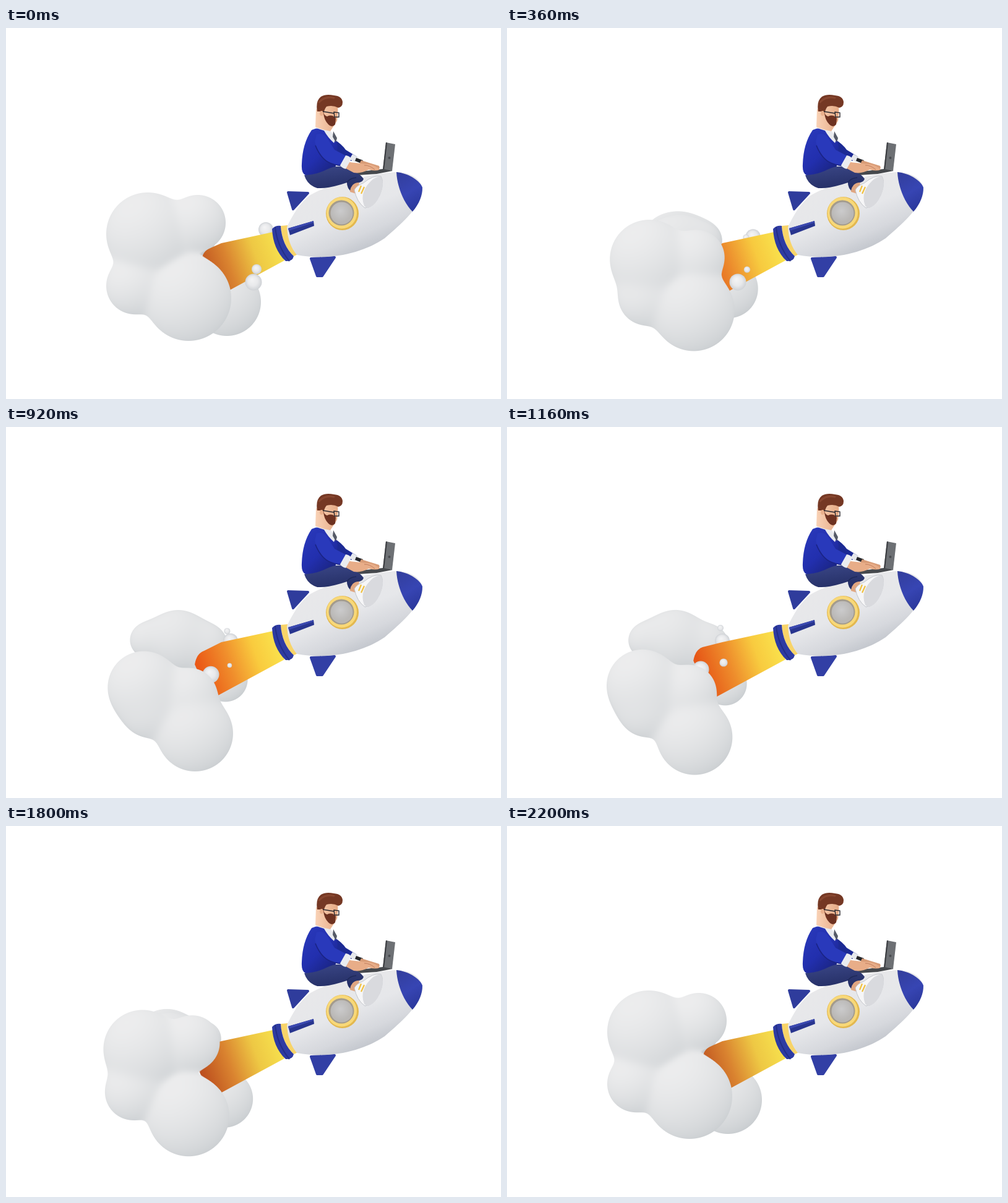
An HTML page with a canvas for the animation above (2.24 s loop, 800x600 px).

```html
<!DOCTYPE html>
<html lang="en">
<head>
<meta charset="utf-8">
<title>Rocket ride</title>
<style>
html, body { margin: 0; width: 100%; height: 100%; overflow: hidden; background: #fff; }
canvas, svg { position: absolute; left: 0; top: 0; width: 800px; height: 600px; }
</style>
</head>
<body>
<canvas id="stage" width="800" height="600"></canvas>
<svg viewBox="0 0 800 600">
  <defs>
    <linearGradient id="hull" gradientUnits="userSpaceOnUse" x1="535" y1="246" x2="584" y2="364">
      <stop offset="0" stop-color="#e8e8ea"/><stop offset=".45" stop-color="#e6e7ea"/>
      <stop offset=".75" stop-color="#d6d8dd"/><stop offset="1" stop-color="#bec2c9"/>
    </linearGradient>
    <linearGradient id="nose" x1=".3" y1="0" x2=".7" y2="1">
      <stop offset="0" stop-color="#333f9f"/><stop offset=".5" stop-color="#3745b3"/><stop offset="1" stop-color="#2a379a"/>
    </linearGradient>
    <linearGradient id="knit" x1="0" y1="0" x2=".7" y2="1">
      <stop offset="0" stop-color="#2a3abc"/><stop offset=".6" stop-color="#222fae"/><stop offset="1" stop-color="#1a2482"/>
    </linearGradient>
    <linearGradient id="jeans" x1="0" y1="0" x2=".3" y2="1">
      <stop offset="0" stop-color="#3b4787"/><stop offset="1" stop-color="#252f66"/>
    </linearGradient>
    <linearGradient id="skin" x1="0" y1="0" x2="1" y2="0">
      <stop offset="0" stop-color="#f9d2b6"/><stop offset="1" stop-color="#e6ab86"/>
    </linearGradient>
    <radialGradient id="glass" cx=".45" cy=".4">
      <stop offset="0" stop-color="#cbcbcc"/><stop offset="1" stop-color="#b9b7b5"/>
    </radialGradient>
  </defs>

  <!-- rocket -->
  <g stroke-linejoin="round" stroke-width="4">
    <path d="M456 266L488 267 464 293Z" fill="#2f3c9c" stroke="#2f3c9c"/>
    <path d="M493 373L531 371 511 401 503 401Z" fill="#323fa5" stroke="#323fa5"/>
  </g>
  <path d="M444 320L455 319Q457 345 472 366L465 369C453 358 445 340 444 320Z" fill="#f8d468"/>
  <path d="M430 325Q435 319 444 320C445 340 453 358 465 369Q463 378 452 377C438 364 431 346 430 325Z" fill="#2e3ba2"/>
  <path d="M435 322C437 342 445 361 458 377" fill="none" stroke="#232e85" stroke-width="2"/>
  <path d="M454 322C463 303 474 283 492 270C526 251 590 235 631 233C662 234 679 252 671 272C664 294 640 316 612 340C577 364 523 377 470 367C460 355 455 340 454 322Z" fill="url(#hull)"/>
  <path d="M631 233C651 235 669 247 673 258C673 271 668 284 657 297C643 283 632 257 631 233Z" fill="url(#nose)"/>
  <path d="M456 324L497 312 498 320 459 335Z" fill="#28358f"/>
  <path d="M456 324L497 312 496 315 457 328Z" fill="#3b49b0"/>
  <ellipse cx="543.5" cy="300" rx="26.5" ry="27" fill="#e3b84f"/>
  <ellipse cx="542.5" cy="299" rx="24.5" ry="25.5" fill="#f8d878"/>
  <circle cx="542" cy="299" r="20.5" fill="#a39b8d"/>
  <circle cx="542.5" cy="299.5" r="18" fill="url(#glass)"/>

  <!-- laptop -->
  <path d="M614 185L629 188 624 231 609 229Z" fill="#6d7074"/>
  <path d="M614 185L616 185.5 611 230 609 229Z" fill="#3b3d41"/>
  <circle cx="619.5" cy="210" r="2" fill="#484b4f"/>
  <path d="M564 233L609 228 625 231 599 236 569 238Z" fill="#46494d"/>

  <!-- far arm and torso -->
  <path d="M530 180Q543 188 549 197L567 208 558 215 535 206Z" fill="#1c2a94"/>
  <path d="M560 204L569 209 564 217 555 212Z" fill="#e6e8ec"/>
  <path d="M566 210L577 214 574 219 564 215Z" fill="#25262b"/>
  <path d="M574 214Q590 219 603 223 606 229 597 230L570 222Z" fill="#d89c77"/>
  <path d="M494 165Q506 159 521 165Q533 177 536 191L532 232Q506 244 484 238Q477 235 478 220Q479 187 494 165Z" fill="url(#knit)"/>

  <!-- legs -->
  <path d="M556 252L571 247 569 269 556 265Z" fill="#e0a681"/>
  <path d="M482 238Q500 238 518 229Q538 219 556 228Q574 237 578 244Q576 250 568 250Q558 252 556 263Q551 258 551 250Q522 260 503 259Q487 254 482 238Z" fill="url(#jeans)"/>
  <path d="M551 250Q555 243 566 242" fill="none" stroke="#1f2959" stroke-width="1.5"/>
  <path d="M563 262Q566 255 577 251Q594 237 606 240Q612 250 604 270Q594 291 580 291Q567 282 563 262Z" fill="#f6f6f7" stroke="#c2c5cb"/>
  <path d="M579 288Q572 270 584 254Q595 240 605 240Q613 249 605 269Q596 290 583 291Z" fill="#d9dade"/>
  <path d="M570 265L574 255M574 268L579 257" stroke="#f0c142" stroke-width="2.2"/>

  <!-- near arm -->
  <path d="M549 216Q570 219 585 220Q597 222 604 229Q598 232 586 229Q574 236 562 234L547 226Z" fill="#e8ad88"/>
  <path d="M579 222Q588 222 596 229" fill="none" stroke="#c08060"/>
  <path d="M502 172Q514 168 521 181L531 197 552 208 546 223Q525 223 513 210Q502 196 499 184Z" fill="#2939bb"/>
  <path d="M500 190Q508 210 521 217Q530 222 545 223" fill="none" stroke="#1a2484" stroke-width="1.6"/>
  <path d="M549 206Q556 207 558 212L549 228Q542 226 540 222Z" fill="#eaecf0"/>

  <!-- head -->
  <path d="M499 161Q511 157 521 161L533 179 530 186Q520 177 514 166Z" fill="#e9eaee"/>
  <path d="M529 167L535 178 533 185 528 176Z" fill="#555a66"/>
  <path d="M501 132L516 126 536 126Q537 138 535 150L530 158 524 167Q509 164 500 160Z" fill="url(#skin)"/>
  <path d="M513 137Q515 142 519 143Q527 139 533 146L532 156Q527 162 521 156Q514 149 513 137Z" fill="#6d3221"/>
  <path d="M503 135Q500 118 509 111Q517 106 530 109Q543 110 544 120Q544 128 537 129Q528 124 518 127Q514 132 513 140L508 135Z" fill="#753824"/>
  <path d="M506 120Q516 110 530 113" fill="none" stroke="#87462f" stroke-width="3" stroke-linecap="round"/>
  <ellipse cx="510" cy="138" rx="3" ry="4" fill="#eab18d"/>
  <path d="M512 135L530 138M530 136L538 137V144L531 144Z" fill="none" stroke="#2a2a30" stroke-width="1.4"/>
</svg>
<script>
const LOOP = 2240, STEP = 40, SWING = LOOP - STEP;
const BOX = { x: 150, y: 255, w: 275, h: 315 };
const SOFT = 900; // blending between neighbouring puffs

// home place, travel at full swing, sideways lead that makes the path a loop
const puff = (x, y, r, dx, dy, dr, leadX, leadY) => ({ q, side }) =>
  [x + dx * q + leadX * side, y + dy * q + leadY * side, r + dr * q];

const frontPuffs = [
  puff(229, 333, 67, -9, 87, -9, 5, 10),
  puff(310, 315, 45, -15, 117, -1, 3, 15),
  puff(208, 417, 46, 20, 40, -1, 12, 4),
  puff(295, 437, 69, 9, 64, -8, 4, -5)
];
const backPuffs = [
  puff(357, 443, 55, -4, -30, -20, 3, -12),
  puff(272, 340, 40, 2, 4, 8, 9, 0),
  puff(316, 338, 24, 10, 14, 8, 0, 0),
  puff(264, 335, 30, -40, 10, -3, 4, 0)
];

// Bubbles drift from start to end with a slight sag.
const bubble = (x, y, r, endX, endY, pulse = 0) => t => {
  const u = t / 1160, size = Math.min(1, (1400 - t) / 200);
  return [x + (endX - x) * u, y + (endY - y) * u + 2 * r * u * (1 - u),
    size * (r - pulse * Math.sin(Math.PI * t / 1400) ** 2)];
};
const backBubbles = [bubble(420, 326, 12, 348, 346), bubble(405, 342, 5, 345, 325)];
const flameBubbles = [bubble(405, 390, 8, 350, 381, 5.5), bubble(400, 411, 13.5, 313, 392)];

const ctx = document.getElementById("stage").getContext("2d");
const layer = document.createElement("canvas");
layer.width = BOX.w;
layer.height = BOX.h;
const layerCtx = layer.getContext("2d");
const image = layerCtx.createImageData(BOX.w, BOX.h);

// Soft union of spheres, shaded from the blended normal.
function drawCloud(puffs, phase, shade) {
  const balls = puffs.map(place => place(phase));
  const px = image.data.fill(0);
  for (let y = 0, p = 0; y < BOX.h; y++) {
    for (let x = 0; x < BOX.w; x++, p += 4) {
      let sum = 0, nx = 0, ny = 0, size = 0;
      for (const [cx, cy, r] of balls) {
        const dx = x + BOX.x + .5 - cx, dy = y + BOX.y + .5 - cy;
        const w = Math.exp((r * r - dx * dx - dy * dy) / SOFT);
        sum += w;
        nx += w * dx / r;
        ny += w * dy / r;
        size += w * r;
      }
      if (sum < .4) continue;
      const edge = Math.log(sum) * SOFT * sum / (2 * size) + .5;
      if (edge <= 0) continue;
      nx /= sum;
      ny /= sum;
      const nz = Math.sqrt(Math.max(0, 1 - nx * nx - ny * ny));
      const light = shade + 26 * (.45 * nz - .3 * nx - .5 * ny);
      px[p] = light;
      px[p + 1] = light + (240 - light) * .1;
      px[p + 2] = light + (244 - light) * .16;
      px[p + 3] = 255 * Math.min(1, edge);
    }
  }
  layerCtx.putImageData(image, 0, 0);
  ctx.drawImage(layer, BOX.x, BOX.y);
}

function drawBubbles(bubbles, t) {
  for (const place of bubbles) {
    const [x, y, r] = place(t);
    if (r <= 0) continue;
    const g = ctx.createRadialGradient(x - r * .2, y - r * .35, 0, x, y, r);
    g.addColorStop(0, "#f4f4f5");
    g.addColorStop(.6, "#e8e9eb");
    g.addColorStop(1, "#cfd2d6");
    ctx.fillStyle = g;
    ctx.beginPath();
    ctx.arc(x, y, r, 0, 7);
    ctx.fill();
  }
}

const mix = (a, b, u) => `rgb(${a.map((v, i) => v + (b[i] - v) * u)})`;

function drawFlame({ q, side }) {
  const x = 320 - 13 * q + 5 * side;
  const y = 358 + 12 * Math.max(0, side);
  const dark = Math.min(1, Math.max(0, 1 - q - side / 2));
  const g = ctx.createLinearGradient(445, 352, 315, 398);
  g.addColorStop(0, mix([250, 228, 78], [247, 226, 78], dark));
  g.addColorStop(.32, mix([249, 203, 62], [238, 200, 68], dark));
  g.addColorStop(.65, mix([240, 142, 44], [218, 132, 48], dark));
  g.addColorStop(1, mix([234, 88, 22], [188, 78, 30], dark));
  ctx.fillStyle = g;
  ctx.beginPath();
  ctx.moveTo(436, 329);
  ctx.lineTo(348, 348);
  ctx.lineTo(x + 10, y - 2);
  ctx.quadraticCurveTo(x - 2, y + 2, x - 5, y + 20);
  ctx.lineTo(330, 441);
  ctx.lineTo(450, 376);
  ctx.fill();
}

let shown = -1;
function frame(now) {
  const t = Math.floor(now % LOOP / STEP) * STEP;
  if (t !== shown) {
    shown = t;
    const angle = 2 * Math.PI * t / SWING;
    const phase = { q: ((1 - Math.cos(angle)) / 2) ** .7, side: Math.sin(angle) };
    ctx.clearRect(0, 0, 800, 600);
    drawCloud(backPuffs, phase, 214);
    drawBubbles(backBubbles, t);
    drawFlame(phase);
    drawBubbles(flameBubbles, t);
    drawCloud(frontPuffs, phase, 217);
  }
  requestAnimationFrame(frame);
}
frame(0);
</script>
</body>
</html>
```
